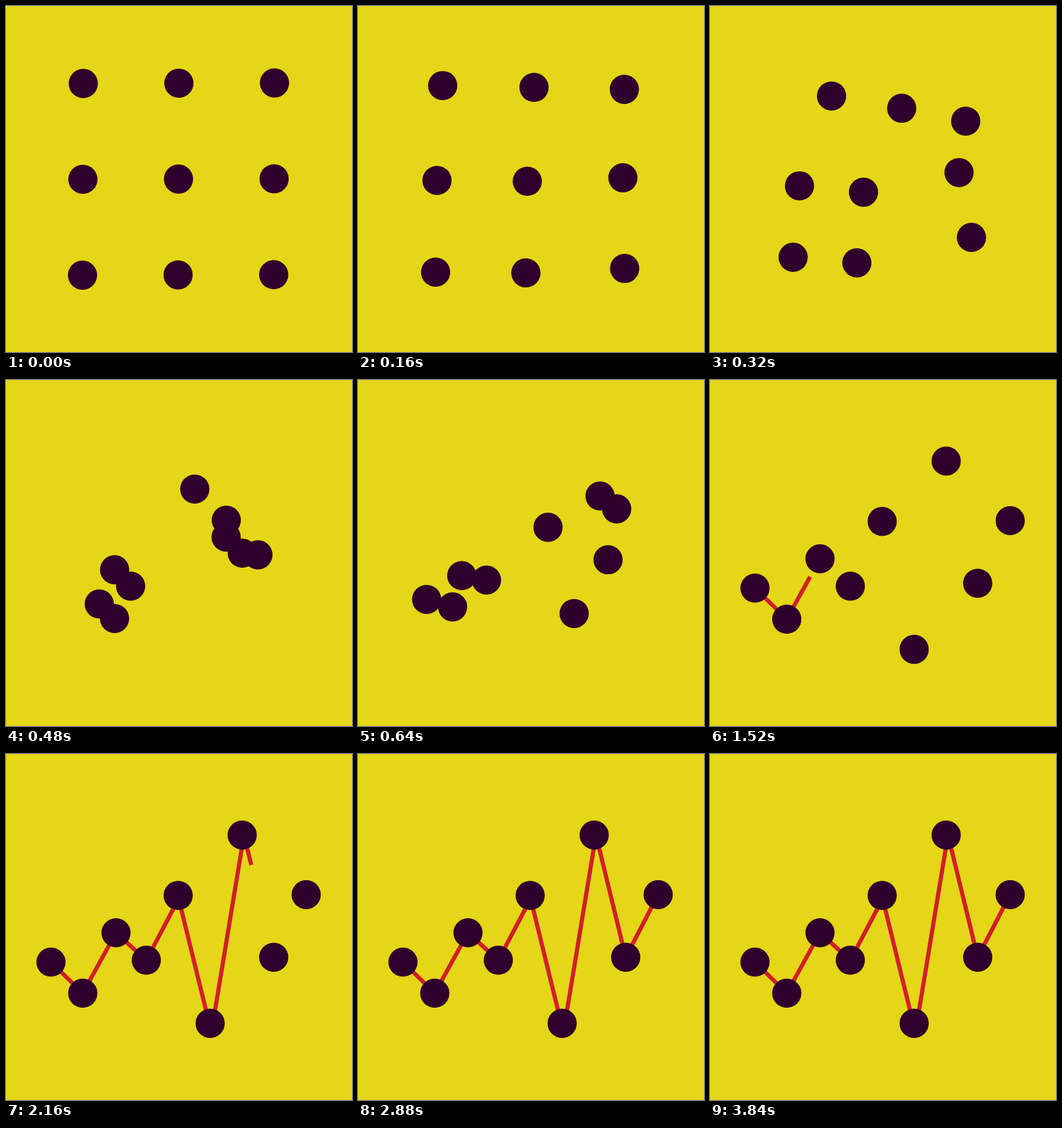
These frames come from a looping animation (540x540 px, 4 s). An HTML page:

```html
<!DOCTYPE html>
<html lang="en">
<head>
<meta charset="utf-8">
<title>Dots to line chart</title>
<style>
  html, body { margin: 0; width: 100%; height: 100%; overflow: hidden; background: #e5d617; }
  svg { display: block; width: 100%; height: 100%; }
  line { stroke: #d01f27; stroke-width: 6.5; }
  circle { fill: #2f002b; }
</style>
</head>
<body>
<svg id="stage" viewBox="0 0 540 540"></svg>
<script>
const LOOP = 4000, STEP = 80, RADIUS = 22.8;

// Chart dots from left to right: x, y, then how far the line's corner sits from the centre
const chart = [
  [70.2, 324.8], [119.8, 373.3], [171.7, 279], [219, 321.8], [268.7, 220.8, 0.8, 5],
  [318.6, 420.4, 2, 14], [368.6, 126.5, 2.8], [417.8, 317.2], [468.5, 219.5]
];
// Chart place taken by each grid dot, row by row
const order = [8, 7, 5, 3, 1, 4, 2, 0, 6];

const stage = document.getElementById('stage');

function set(el, attrs) {
  for (const key in attrs) el.setAttribute(key, attrs[key]);
}

function add(tag, attrs) {
  const el = document.createElementNS('http://www.w3.org/2000/svg', tag);
  set(el, attrs);
  stage.appendChild(el);
  return el;
}

const clamp = v => Math.min(1, Math.max(0, v));
const mix = (a, b, p) => a + (b - a) * p;
const smooth = u => u * u * (3 - 2 * u);

// Ease with handles (a, 0) and (b, 1), solved by bisection
function ease(x, a, b) {
  if (x <= 0 || x >= 1) return clamp(x);
  let lo = 0, hi = 1;
  for (let i = 0; i < 24; i++) {
    const u = (lo + hi) / 2, v = 1 - u;
    if (3 * a * u * v * v + 3 * b * u * u * v + u * u * u < x) lo = u;
    else hi = u;
  }
  return smooth(lo);
}

const corners = chart.map(([x, y, dx = 0, dy = 0]) => [x + dx, y + dy]);
let total = 0;
const segments = corners.slice(1).map(([x2, y2], i) => {
  const [x1, y1] = corners[i];
  const start = total, len = Math.hypot(x2 - x1, y2 - y1);
  total += len;
  return { x1, y1, x2, y2, start, len, el: add('line', { x1, y1 }) };
});

// The grid leans very slightly
const dots = order.map((place, i) => {
  const col = i % 3, row = Math.floor(i / 3);
  const from = [120.6 + 149.2 * col - 0.6 * row, 120.9 + 149.6 * row - 0.4 * col];
  return { from, to: chart[place], el: add('circle', { r: RADIUS }) };
});

function draw(t) {
  const move = ease((t - 40) / 839, 0.472, 0.593);
  for (const { from, to, el } of dots) {
    set(el, { cx: mix(from[0], to[0], move), cy: mix(from[1], to[1], move) });
  }

  const drawn = total * smooth(clamp((t - 1228) / 1335));
  for (const s of segments) {
    const p = clamp((drawn - s.start) / s.len);
    set(s.el, {
      x2: mix(s.x1, s.x2, p),
      y2: mix(s.y1, s.y2, p),
      visibility: p > 0 ? 'visible' : 'hidden'
    });
  }
}

const begin = performance.now();
function tick() {
  // The small lead keeps a step from landing one refresh late
  const t = (performance.now() - begin + 8) % LOOP;
  draw(Math.floor(t / STEP) * STEP);
  requestAnimationFrame(tick);
}
draw(0);
requestAnimationFrame(tick);
</script>
</body>
</html>
```
